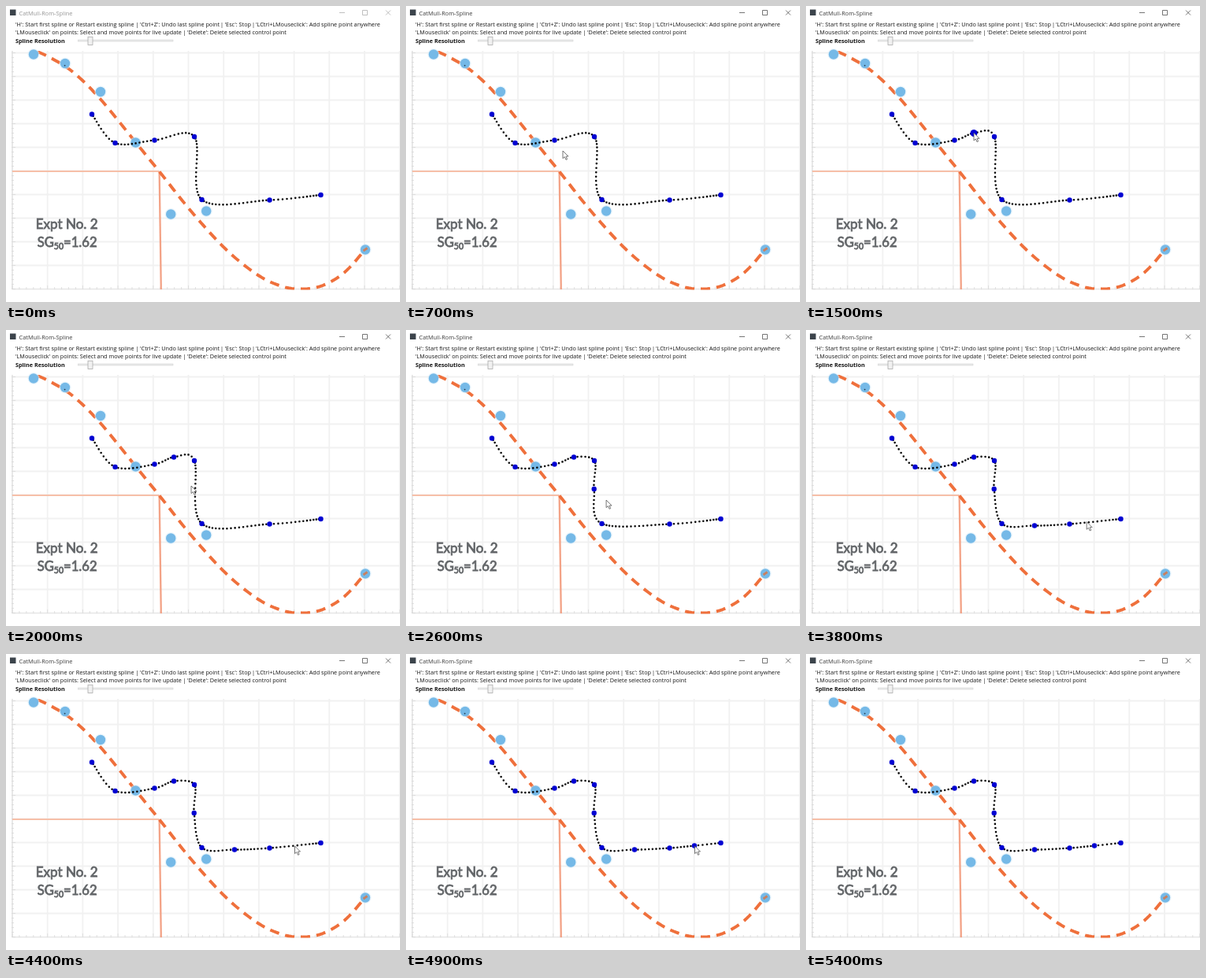
An HTML page for the animation above (5800 ms loop, 500 px wide and 376 px high).

```html
<!DOCTYPE html>
<html lang="en">
<head>
<meta charset="utf-8">
<title>CatMull-Rom-Spline</title>
<style>
  html, body { margin: 0; width: 100%; height: 100%; overflow: hidden; background: #fff; }
  svg { display: block; width: 100%; height: 100%; }
  text { font-family: "Open Sans", "Noto Sans", sans-serif; fill: #141414; white-space: pre; }
  .label text { font-family: Lato, "Open Sans", sans-serif; fill: #626568; stroke: #626568; stroke-width: .8; }
</style>
</head>
<body>
<svg viewBox="0 0 500 376" xmlns="http://www.w3.org/2000/svg">
  <defs>
    <filter id="soft" x="-10%" y="-20%" width="120%" height="140%"><feGaussianBlur stdDeviation=".65"/></filter>
    <clipPath id="plot"><rect x="6" y="57" width="494" height="303.5"/></clipPath>
  </defs>
  <rect width="500" height="376" fill="#fff"/>

  <rect x="5" y="4.5" width="7.5" height="7.5" fill="#3c444c"/>
  <text id="title" x="16.5" y="11.7" font-size="7.4">CatMull-Rom-Spline</text>
  <path id="buttons" d="M423 8.5h7M452.5 5.5h6v6h-6zM482 5.5l6 6M488 5.5l-6 6" fill="none" stroke-width=".7"/>

  <g font-size="7.25">
    <text x="12" y="26">'H': Start first spline or Restart existing spline</text>
    <text x="164.5" y="26">|</text>
    <text x="170" y="26">'Ctrl+Z': Undo last spline point</text>
    <text x="272" y="26">|</text>
    <text x="277.5" y="26">'Esc': Stop</text>
    <text x="312" y="26">|</text>
    <text x="317" y="26">'LCtrl+LMouseclick': Add spline point anywhere</text>
    <text x="12" y="36.4">'LMouseclick' on points: Select and move points for live update</text>
    <text x="224.5" y="36.4">|</text>
    <text x="230" y="36.4">'Delete': Delete selected control point</text>
    <text x="12" y="46.8" font-weight="700">Spline Resolution</text>
  </g>

  <rect x="91.5" y="43" width="120.5" height="2" fill="#e9ebeb" stroke="#d4d4d4" stroke-width=".6"/>
  <rect x="104" y="39.2" width="6" height="10.3" fill="#f1f1f1" stroke="#acacac" stroke-width=".8"/>

  <g clip-path="url(#plot)">
    <path id="grid" fill="none" stroke="#f1f1f1" stroke-width="1.8"/>
    <path id="ticks" fill="none" stroke="#dadada" stroke-width=".8"/>
    <g filter="url(#soft)" fill="none">
      <path d="M8 210H194.5" stroke="#f6bfa8" stroke-width="1.9"/>
      <path d="M194.6 210L196.8 360" stroke="#f3a387" stroke-width="2.3"/>
    </g>
    <path id="curve" fill="none" stroke="#ef703c" stroke-width="3.9" stroke-dasharray="12 8" stroke-dashoffset="-4" filter="url(#soft)"/>
  </g>
  <g id="samples"></g>
  <circle cx="74.6" cy="75.6" r=".9" fill="#263c50"/>
  <path d="M453.5 311l5-3.5" stroke="#c9805f" stroke-width="2.8"/>

  <g class="label" filter="url(#soft)">
    <text x="37.8" y="282.8" font-size="17">Expt No. 2</text>
    <text x="39.7" y="306.2" font-size="16.6">SG<tspan font-size="10.6" dy="3">50</tspan><tspan dy="-3">=1.62</tspan></text>
  </g>

  <path id="dots" fill="none" stroke="#080808" stroke-width="2.6" stroke-linecap="round"/>
  <g id="knots" fill="#0000d2"></g>
  <path id="cursor" d="M0 0V9.6L2.3 7.6L4 11.3L5.6 10.6L4 7H7Z" fill="#fff" stroke="#555" stroke-width=".8" stroke-linejoin="round"/>
</svg>
<script>
const LOOP = 5800, STEP = 100;
const el = id => document.getElementById(id);
const range = (n, f) => Array.from({ length: n }, (_, i) => f(i));

// Control points; "at" is the moment a point is added, "hot" how long it stays enlarged.
const points = [
  { x: 109, y: 137.5 }, { x: 138.5, y: 174 }, { x: 188.5, y: 170.5 },
  { x: 213, y: 161.5, at: 1500, hot: 100 },
  { x: 239, y: 166 },
  { x: 238.7, y: 202, at: 2300, hot: 100 },
  { x: 248.5, y: 246 },
  { x: 290, y: 248.5, at: 3300, hot: 200 },
  { x: 334.5, y: 246.5 },
  { x: 366, y: 243.5, at: 4600, hot: 100 },
  { x: 399.5, y: 240 }
];

// Cursor moves: start time, number of steps, destination.
const entry = [268, 330];
const moves = [
  [300, 5, 199, 184], [900, 4, 213, 161.3], [1600, 5, 235, 198],
  [2100, 1, 238.5, 201.5], [2600, 6, 289.5, 249], [3500, 6, 364.5, 243],
  [4200, 1, 366.5, 244], [5300, 2, 400, 330]
];

function hermite(a, b, ma, mb, t) {
  const u = 1 - t;
  return (1 + 2 * t) * u * u * a + t * u * u * ma + t * t * (3 - 2 * t) * b - t * t * u * mb;
}

// Uniform Catmull-Rom, sampled about every "gap" pixels.
function spline(p, gap) {
  const out = [], get = i => p[Math.max(0, Math.min(p.length - 1, i))];
  for (let i = 0; i < p.length - 1; i++) {
    const [o, a, b, c] = [get(i - 1), get(i), get(i + 1), get(i + 2)];
    const n = Math.max(2, Math.round(Math.hypot(b.x - a.x, b.y - a.y) / gap));
    const at = (k, t) => hermite(a[k], b[k], (b[k] - o[k]) / 2, (c[k] - a[k]) / 2, t);
    for (let j = 0; j < n; j++) out.push([at("x", j / n), at("y", j / n)]);
  }
  return out;
}

const fix = ([x, y]) => x.toFixed(2) + " " + y.toFixed(2);

function drawChart() {
  el("grid").setAttribute("d",
    range(12, i => `M${8 + 44.7 * i} 57V360`).join("") +
    range(11, i => `M8 ${59.5 + 30 * i}H500`).join(""));
  el("ticks").setAttribute("d",
    range(51, i => `M7 ${59.5 + 6 * i}h${i % 5 ? 3 : 5}`).join("") +
    range(56, i => `M${8 + 8.94 * i} 360v${i % 5 ? -3 : -5}`).join("") + "M8 57V360H500");
  const curve = [[36, 57], [48, 61.5], [75, 76.5], [97, 94.5], [120, 118.5], [142, 145], [164, 172.5],
    [194, 209.5], [236, 262], [280, 310], [320, 342], [350, 356], [375, 359.5], [402, 355], [430, 338], [456, 309]];
  const line = spline(curve.map(([x, y]) => ({ x, y })), 4);
  el("curve").setAttribute("d", "M" + [...line, [456, 309]].map(fix).join("L"));
  const samples = [[35, 61.5], [75, 73], [120, 109], [164.5, 173.5], [209.2, 264.5], [254.2, 260.5], [456, 309.5]];
  el("samples").innerHTML = samples.map(([x, y]) =>
    `<circle cx="${x}" cy="${y}" r="7.6" fill="#d9edf9" opacity=".55"/>` +
    `<circle cx="${x}" cy="${y}" r="6.2" fill="#75b9e7"/>`).join("");
}

function cursorAt(t) {
  let [x, y] = entry;
  for (const [start, steps, tx, ty] of moves) {
    if (t < start) break;
    const k = Math.min(1, (Math.floor((t - start) / STEP) + 1) / steps);
    const e = k * (2 - k);
    x += (tx - x) * e;
    y += (ty - y) * e;
  }
  return [x, y];
}

let drawn = "";
function drawSpline(t) {
  const live = points.filter(p => !p.at || t >= p.at);
  const isHot = p => p.at && t < p.at + p.hot;
  const key = live.length + ":" + live.filter(isHot).length;
  if (key === drawn) return;
  drawn = key;
  el("dots").setAttribute("d", spline(live, 4.6).map(p => `M${fix(p)}h.01`).join(""));
  el("knots").innerHTML = live.map(p =>
    `<circle cx="${p.x}" cy="${p.y}" r="${isHot(p) ? 4.5 : 3.2}"/>`).join("");
}

function render(t) {
  const active = t >= 300;
  el("title").style.fill = active ? "#3c3c3c" : "#969696";
  el("buttons").setAttribute("stroke", active ? "#3a3a3a" : "#a4a4a4");
  drawSpline(t);
  const [x, y] = cursorAt(t);
  el("cursor").setAttribute("transform", `translate(${x.toFixed(2)} ${y.toFixed(2)})`);
  el("cursor").style.display = active && t < 5400 ? "" : "none";
}

drawChart();
render(0);
const begin = performance.now();
function tick() {
  render((performance.now() - begin) % LOOP);
  requestAnimationFrame(tick);
}
requestAnimationFrame(tick);
</script>
</body>
</html>
```
